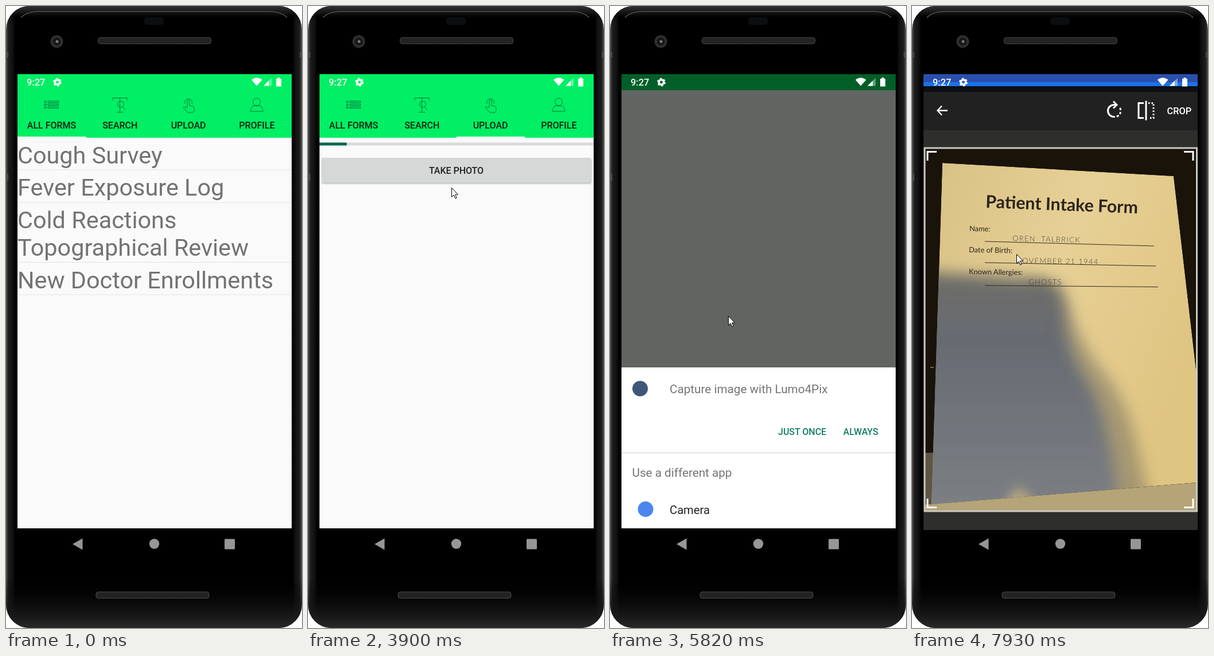
An HTML page for the animation above (8 s loop, 516 px wide and 1086 px high).

```html
<!DOCTYPE html>
<html lang="en">
<head>
<meta charset="utf-8">
<title>Phone form upload</title>
<style>
html, body { margin: 0; width: 100%; height: 100%; overflow: hidden; background: #fff; }
svg { display: block; width: 516px; height: 1086px; font-family: Roboto, sans-serif; }
.medium { font-weight: 500; }
.mid { text-anchor: middle; }
.thin { fill: none; stroke: #022; stroke-width: .6; }
.line { fill: none; stroke: #fff; stroke-width: 2.4; }
.list { font-size: 41.4px; fill: #737373; }
.lato { font-family: Lato, sans-serif; fill: #2b251a; }
.hand { font-family: Lato, sans-serif; font-weight: 300; font-size: 13px; fill: #4b4538; letter-spacing: 1.3px; white-space: pre; }
.serif { font-family: "Liberation Serif", serif; }
.sans { font-family: "Liberation Sans", sans-serif; }
</style>
</head>
<body>
<svg viewBox="0 0 516 1086">
<defs>
  <linearGradient id="sides">
    <stop offset="0" stop-color="#555"/><stop offset=".008" stop-color="#1d1d1d"/><stop offset=".022" stop-color="#111"/>
    <stop offset=".032" stop-color="#000"/><stop offset=".968" stop-color="#000"/><stop offset=".978" stop-color="#111"/>
    <stop offset=".992" stop-color="#1d1d1d"/><stop offset="1" stop-color="#555"/>
  </linearGradient>
  <linearGradient id="ends" x2="0" y2="1">
    <stop offset="0" stop-color="#333"/><stop offset=".012" stop-color="#111"/><stop offset=".022" stop-color="#000" stop-opacity="0"/>
    <stop offset=".92" stop-color="#000" stop-opacity="0"/><stop offset=".985" stop-color="#1c1c1c"/><stop offset="1" stop-color="#292929"/>
  </linearGradient>
  <linearGradient id="paper" x1="0" y1="0" x2="1" y2=".5">
    <stop offset="0" stop-color="#d9c185"/><stop offset=".5" stop-color="#e7d096"/><stop offset="1" stop-color="#dfc582"/>
  </linearGradient>
  <linearGradient id="shade" x2="0" y2="1">
    <stop offset="0" stop-color="#6e6d67"/><stop offset=".3" stop-color="#676b72"/><stop offset="1" stop-color="#7c8084"/>
  </linearGradient>
  <linearGradient id="wall" x2=".3" y2="1">
    <stop offset="0" stop-color="#a5a4a1"/><stop offset=".6" stop-color="#b2b1b0"/><stop offset="1" stop-color="#8b8b8d"/>
  </linearGradient>
  <pattern id="mesh" width="3" height="3" patternUnits="userSpaceOnUse"><rect width="3" height="3" fill="#1b1b1b"/><path d="M0 3L3 0" stroke="#383838" stroke-width=".8"/></pattern>
  <filter id="soft" x="-20%" y="-20%" width="140%" height="140%"><feGaussianBlur stdDeviation="13"/></filter>
  <filter id="blur"><feGaussianBlur stdDeviation="1.5"/></filter>
  <clipPath id="screen"><rect x="20" y="119" width="478" height="793"/></clipPath>
  <clipPath id="below"><rect x="20" y="230" width="478" height="682"/></clipPath>
  <clipPath id="revealed"><rect id="reveal" x="20" y="140" width="478" height="775"/></clipPath>
  <clipPath id="frame"><rect x="21" y="247" width="476" height="636"/></clipPath>
  <clipPath id="sheetOfPaper"><path id="page" d="M53 274L456 297L498 660V832L34 870Z"/></clipPath>
  <clipPath id="thumbA"><rect x="38" y="300" width="214" height="213"/></clipPath>
  <clipPath id="thumbB"><rect x="265" y="300" width="214" height="213"/></clipPath>

  <g id="photo" clip-path="url(#frame)">
    <rect x="20" y="247" width="478" height="636" fill="#19130a"/>
    <path d="M21 780H60V883H21Z" fill="#5d5644"/>
    <path d="M20 871L498 832V883H20Z" fill="#b5a477"/>
    <path d="M32 631h6" stroke="#86682d" stroke-width="2"/>
    <g clip-path="url(#sheetOfPaper)">
      <use href="#page" fill="url(#paper)"/>
      <path d="M200 480L262 490Q285 570 320 620Q370 680 385 740Q400 800 420 890H200Z" fill="#7f7865" opacity=".6" filter="url(#soft)"/>
      <path d="M0 462L235 478Q266 490 267 560Q274 610 308 660Q346 725 364 890H215L190 838L165 890H0Z" fill="url(#shade)" filter="url(#soft)"/>
      <path d="M190 850L210 884H165Z" fill="#bda878" filter="url(#soft)"/>
    </g>
    <g class="lato">
      <text transform="translate(128 352) rotate(2.2)" font-size="30.3" font-weight="700">Patient Intake Form</text>
      <g font-size="12.8">
        <text transform="translate(100 393) rotate(1)">Name:</text>
        <text transform="translate(99 430) rotate(1)">Date of Birth:</text>
        <text transform="translate(99 468) rotate(1)">Known Allergies:</text>
      </g>
    </g>
    <path d="M127 411L422 419M127 448L425 454M127 488L429 490.500" stroke="#332c20"/>
    <text class="hand" transform="translate(175 410) rotate(1.5)">OREN  TALBRICK</text>
    <text class="hand" transform="translate(181 449) rotate(.8)">NOVEMBER 21 1944</text>
    <text class="hand" transform="translate(203 487)">GHOSTS</text>
  </g>
  <g id="fileIcon">
    <rect width="20" height="20" rx="2" fill="#db4437"/><path d="M3 16L7 10.500L10 14L13.500 9L18 16Z" fill="#fff"/>
  </g>
</defs>

<!-- phone body -->
<rect width="516" height="1086" rx="41" fill="url(#sides)"/>
<rect width="516" height="1086" rx="41" fill="url(#ends)"/>
<path d="M26 20Q36 10 56 9.500H460Q480 10 490 20" fill="none" stroke="#666" stroke-width="1.200"/>
<path d="M0 80h4v10h-4zM512 80h4v10h-4zM0 293h4v12h-4z" fill="#4b4b4b"/>
<rect x="241" y="20" width="34" height="13" rx="5" fill="#0c0e12"/>
<circle cx="88.500" cy="62" r="11" fill="#303030"/><circle cx="88.500" cy="62" r="7" fill="#171717"/><circle cx="89" cy="62" r="2.500" fill="#777"/>
<rect x="160.500" y="55" width="197" height="11" rx="4" fill="url(#mesh)" stroke="#484848"/>
<rect x="157" y="1023" width="197" height="11" rx="4" fill="url(#mesh)" stroke="#484848"/>

<g clip-path="url(#screen)">
  <!-- forms app -->
  <rect x="20" y="119" width="478" height="793" fill="#fafafa"/>
  <g clip-path="url(#below)">
    <g id="formList"></g>
    <g id="upload">
      <g id="progress"><path d="M20 241H498" stroke="#dadada" stroke-width="5"/><path d="M20 241H67.500" stroke="#006650" stroke-width="5"/></g>
      <rect x="24.500" y="267" width="469" height="43" rx="2" fill="#aaa" filter="url(#blur)"/>
      <rect id="photoButton" x="24" y="265" width="469" height="43.500" rx="2"/>
      <text class="medium mid" x="258.500" y="293" font-size="16" fill="#212121">TAKE PHOTO</text>
    </g>
  </g>
  <rect x="20" y="119" width="478" height="111" fill="#00ef64"/>
  <g class="thin">
    <path d="M73 166h18.500v2.500h-18.500zM73 171h18.500v2.500h-18.500zM73 176h18.500v2.500h-18.500zM67 166h3v2.500h-3zM67 171h3v2.500h-3zM67 176h3v2.500h-3z"/>
    <path d="M186 165V160.500H211V165M198.500 160V185.500M193 185.500H204M203 176L208 181"/><circle cx="200" cy="171.500" r="5.500"/>
    <path d="M316 177V165q2-3 4 0v9l6 1q2 1 2 4v3l-2 4h-9l-8-9q1-2 4 0z"/><path d="M312 171a6.500 6.500 0 1 1 12 0"/>
    <circle cx="437" cy="167.500" r="6.500"/><path d="M426 184q1-10 8-10h6q7 0 8 10z"/>
  </g>
  <g id="tabs" class="medium mid" font-size="16" fill="#04220f"></g>
  <rect id="indicator" x="20" y="228" width="119.500" height="2.500" fill="#fff"/>

  <!-- app chooser -->
  <g id="chooser">
    <g id="scrim"><rect x="20" y="147" width="478" height="765" fill="#f7fbf7"/><rect x="20" y="119" width="478" height="793" opacity=".6"/></g>
    <g id="sheet">
      <rect x="20" y="631" width="478" height="281" fill="#fff"/>
      <circle cx="52.500" cy="668" r="13.500" fill="#3f5679"/><circle cx="62" cy="878.500" r="13.500" fill="#4b86ee"/>
      <rect id="oncePress" x="285" y="722" width="102" height="41" rx="2" fill="#000" opacity=".1"/>
      <path d="M20 780H498" stroke="#dcdcdc" stroke-width="1.500"/>
      <g font-size="20.700" fill="#757575">
        <text x="104" y="676">Capture image with Lumo4Pix</text>
        <text x="38.500" y="821.500">Use a different app</text>
        <text x="104" y="886.500" font-size="20.200" fill="#222">Camera</text>
      </g>
      <g class="medium" font-size="16" fill="#107d67"><text x="293" y="748.500">JUST ONCE</text><text x="406.500" y="748.500">ALWAYS</text></g>
    </g>
  </g>

  <!-- downloads -->
  <g id="downloads">
    <rect x="20" y="119" width="478" height="820" fill="#f6f6f6"/>
    <rect x="20" y="210" width="478" height="70" fill="#f2f2f2"/><path d="M20 280.500H498" stroke="#dedede"/>
    <rect x="20" y="150" width="478" height="64" fill="#999" filter="url(#blur)"/>
    <rect x="20" y="146" width="478" height="65.500" fill="#1c72e8"/><rect x="20" y="119" width="478" height="28" fill="#294fae"/>
    <path class="line" d="M42 173.500H63M42 179.500H63M42 185.500H63" stroke-width="2"/>
    <text class="medium" x="104" y="188" font-size="22.800" fill="#fff">Downloads</text>
    <circle class="line" cx="364" cy="176" r="6"/><path class="line" d="M368.500 180.500L376 188"/>
    <path d="M413 171h4v4.500h-4zm5.500 0h15v4.500h-15zM413 177h4v4.500h-4zm5.500 0h15v4.500h-15zM413 183h4v4.500h-4zm5.500 0h15v4.500h-15z" fill="#fff"/>
    <g fill="#fff"><circle cx="471.500" cy="172" r="2.500"/><circle cx="471.500" cy="179.500" r="2.500"/><circle cx="471.500" cy="187" r="2.500"/></g>
    <g id="sort"><text class="medium" x="326" y="254.500" font-size="20.500" fill="#222">Modified</text><path d="M446 242l9.500 9.500L465 242" fill="none" stroke="#222" stroke-width="3"/></g>
    <g id="files">
      <path d="M38 301h214v276H38zM265 301h214v276H265z" fill="#bbb" filter="url(#blur)"/>
      <path d="M38 300h214v276H38zM265 300h214v276H265z" fill="#fff"/>
      <g clip-path="url(#thumbA)"><use href="#photo" transform="translate(145 406.500) scale(.45) translate(-259 -565)"/></g>
      <g clip-path="url(#thumbB)">
        <rect x="265" y="300" width="214" height="213" fill="url(#wall)"/>
        <path d="M265 350L310 365L300 513H265Z" fill="#88888a" filter="url(#soft)"/>
        <path d="M313 296H415L426 474L395 479L306 476Z" fill="#777" filter="url(#blur)"/>
        <path d="M312 296H413L423 472L395 475L306 474Z" fill="#c9c9ce"/>
        <g class="mid" fill="#222">
          <circle cx="324" cy="316" r="7"/><circle cx="362" cy="358" r="8"/>
          <g class="serif"><text x="374" y="313" font-size="10.500">VELDORANT</text><text x="374" y="322" font-size="10.500">GROUP, INC.</text>
            <g fill="#555"><text x="363" y="385" font-size="14">VELDORANT</text><text x="365" y="395" font-size="7.500">GROUP</text></g></g>
          <g class="sans"><text x="362" y="337" font-size="11.500" font-weight="700">VISITOR</text><text x="362" y="344" font-size="7">March 15, 2022</text>
            <text x="364" y="409" font-size="10" font-weight="700">Dale Norwick</text>
            <text x="364" y="425.500" font-size="7.300">38 (Floor 38)</text><text x="365" y="440" font-size="7.500">TarnoLB</text></g>
        </g>
      </g>
      <use href="#fileIcon" x="60" y="534"/><use href="#fileIcon" x="287" y="534"/>
      <g font-size="18.700" fill="#333"><text x="97" y="542.500">medform.jpg</text><text x="324" y="542.500">IMG_20220315…</text></g>
      <g font-size="14.200" fill="#444"><text x="97" y="563">502 kB 9:18 AM</text><text x="324" y="563">21.56 kB Mar 15</text></g>
    </g>
  </g>
</g>

<!-- crop screen -->
<g id="crop" clip-path="url(#revealed)"><g id="cropBody">
  <rect x="20" y="119" width="478" height="796" fill="#2e2e2d"/>
  <rect x="20" y="119" width="478" height="98" fill="#212121"/><rect x="20" y="119" width="478" height="31" fill="#0d0f12"/>
  <path class="line" d="M62 182.500H45M52 174.500L44.500 182.500L52 190.500" stroke-width="2"/>
  <g class="line" style="stroke-width: 3">
    <path d="M352 193.500a10.500 10.500 0 1 1 0-21h4M351 166.500l6 6l-6 6"/><path d="M362.500 178a10.500 10.500 0 0 1-10.500 15.500" stroke-dasharray="4 3"/>
    <path d="M404 169.500H395V195.500H404M408 165.500V199.500"/><path d="M412 169.500H421V195.500H412" stroke-dasharray="2.500 3"/>
  </g>
  <text class="medium" x="444.500" y="188.500" font-size="16.400" fill="#fff">CROP</text>
  <use href="#photo"/>
  <rect x="22" y="248" width="474.500" height="634" fill="none" stroke="#c9c8c2" stroke-width="3"/>
  <path class="line" style="stroke-width: 3" d="M27 270V254.500H43M474 254.500H490V270M27 860V875.500H43M474 875.500H490V860"/>
</g></g>

<!-- status and navigation -->
<g fill="#fff">
  <text class="medium" x="36" y="139" font-size="16.400">9:27</text>
  <circle cx="89.500" cy="133" r="4.200" fill="none" stroke="#fff" stroke-width="3.500"/><circle cx="89.500" cy="133" r="6.300" fill="none" stroke="#fff" stroke-width="2.200" stroke-dasharray="3.300"/>
  <path d="M428 129Q437 121.500 446.500 129L437 139.500Z"/>
  <path d="M449 139.500L463 125.500V139.500Z" opacity=".4"/><path d="M449 139.500L458 130.500V139.500Z"/>
  <path d="M471 127h2.500v-2h4v2h2.500v13.500h-9z"/>
</g>
<g fill="#969696"><path d="M116 939.500L133.500 929.500V949.500Z"/><circle cx="258.500" cy="939" r="8.700"/><rect x="381" y="930.500" width="18" height="18" rx="1.500"/></g>

<g id="pointer">
  <circle id="tap" r="11.500" fill="#777" opacity=".35"/>
  <path d="M.5 .5V16.500L4.200 13L6.800 19L9.200 18L6.700 12.200H11.500Z" fill="#fff" stroke="#000"/>
</g>
</svg>
<script>
const el = id => document.getElementById(id);
const show = (id, on) => el(id).style.display = on ? '' : 'none';
const move = (id, x, y) => el(id).setAttribute('transform', `translate(${x} ${y})`);
const ratio = (t, from, to) => Math.min(1, Math.max(0, (t - from) / (to - from)));
const smooth = p => p * p * (3 - 2 * p);
const easeOut = p => 1 - (1 - p) ** 2;
const within = (t, from, to) => t >= from && t < to;

el('tabs').innerHTML = ['ALL FORMS', 'SEARCH', 'UPLOAD', 'PROFILE']
  .map((label, i) => `<text x="${79.5 + i * 119.3}" y="213.500">${label}</text>`).join('');
el('formList').innerHTML =
  [[275, 'Cough Survey'], [331, 'Fever Exposure Log'], [387.5, 'Cold Reactions'], [436, 'Topographical Review'], [492.5, 'New Doctor Enrollments']]
    .map(([y, title]) => `<text class="list" x="20" y="${y}">${title}</text>`).join('') +
  [286, 343, 447.5, 504].map(y => `<path d="M20 ${y}H498" stroke="#e4e4e4"/>`).join('');

const updates = [[270, 960, 10], [1510, 1980, 7], [2210, 2520, 5], [2750, 3130, 6], [3290, 3290, 1], [3440, 3590, 3],
  [3820, 4290, 7], [4440, 4900, 7], [5060, 5060, 1], [5210, 5980, 11], [6050, 6050, 1], [6200, 6200, 1],
  [6680, 6920, 4], [7070, 7150, 2], [7680, 7930, 4]]
  .flatMap(([from, to, n]) => Array.from({ length: n }, (_, i) => from + (to - from) * i / Math.max(1, n - 1)));
const held = t => updates.filter(u => u <= t + 8).pop() ?? 0;

// time, x, y
const path = [[270, 496, 322], [960, 333, 190], [2130, 333, 190], [2520, 284, 298], [2680, 284, 298], [3130, 294, 295],
  [3590, 294, 295], [3820, 250, 317], [3900, 250, 317], [4290, 272, 399], [4440, 306, 455], [4517, 325, 489],
  [4750, 372, 640], [4900, 359, 739], [5210, 359, 739], [5749, 206, 541], [5826, 206, 541], [5980, 219, 530],
  [6600, 219, 530], [6920, 182, 433]];

function pointerAt(t) {
  const next = path.findIndex(k => k[0] > t);
  if (next < 1) return path[next < 0 ? path.length - 1 : 0].slice(1);
  const [a, b] = [path[next - 1], path[next]], p = ratio(t, a[0], b[0]);
  return [a[1] + (b[1] - a[1]) * p, a[2] + (b[2] - a[2]) * p];
}

function draw(t) {
  const swipe = smooth(ratio(t, 1470, 1980));
  move('formList', -956 * swipe, 0);
  move('upload', 956 * (1 - swipe), 0);
  move('indicator', 238.6 * swipe, 0);
  show('progress', t >= 2820);
  el('photoButton').setAttribute('fill', within(t, 3440, 3590) ? '#c6c8c8' : '#d6d7d7');

  const open = easeOut(ratio(t, 3900, 4290));
  show('chooser', open > 0);
  el('scrim').setAttribute('opacity', open);
  move('sheet', 0, 281 * (1 - open));
  show('oncePress', within(t, 5210, 5500));

  const loaded = ratio(t, 5830, 5980), reveal = easeOut(ratio(t, 7597, 7930));
  show('downloads', loaded > 0);
  el('downloads').setAttribute('opacity', loaded);
  show('sort', t >= 6050);
  show('files', t >= 6200);
  move('downloads', 0, -14 * reveal);

  show('crop', t >= 7680);
  el('reveal').setAttribute('y', 912 - 772 * reveal);
  move('cropBody', 0, 30 * (1 - reveal));

  show('pointer', t >= 270);
  move('pointer', ...pointerAt(t));
  show('tap', [[1510, 1580], [3290, 3440], [5060, 5210], [7070, 7150]].some(([a, b]) => within(t, a, b)));
}

const start = performance.now();
(function tick() {
  draw(held((performance.now() - start) % 8000));
  requestAnimationFrame(tick);
})();
</script>
</body>
</html>
```
